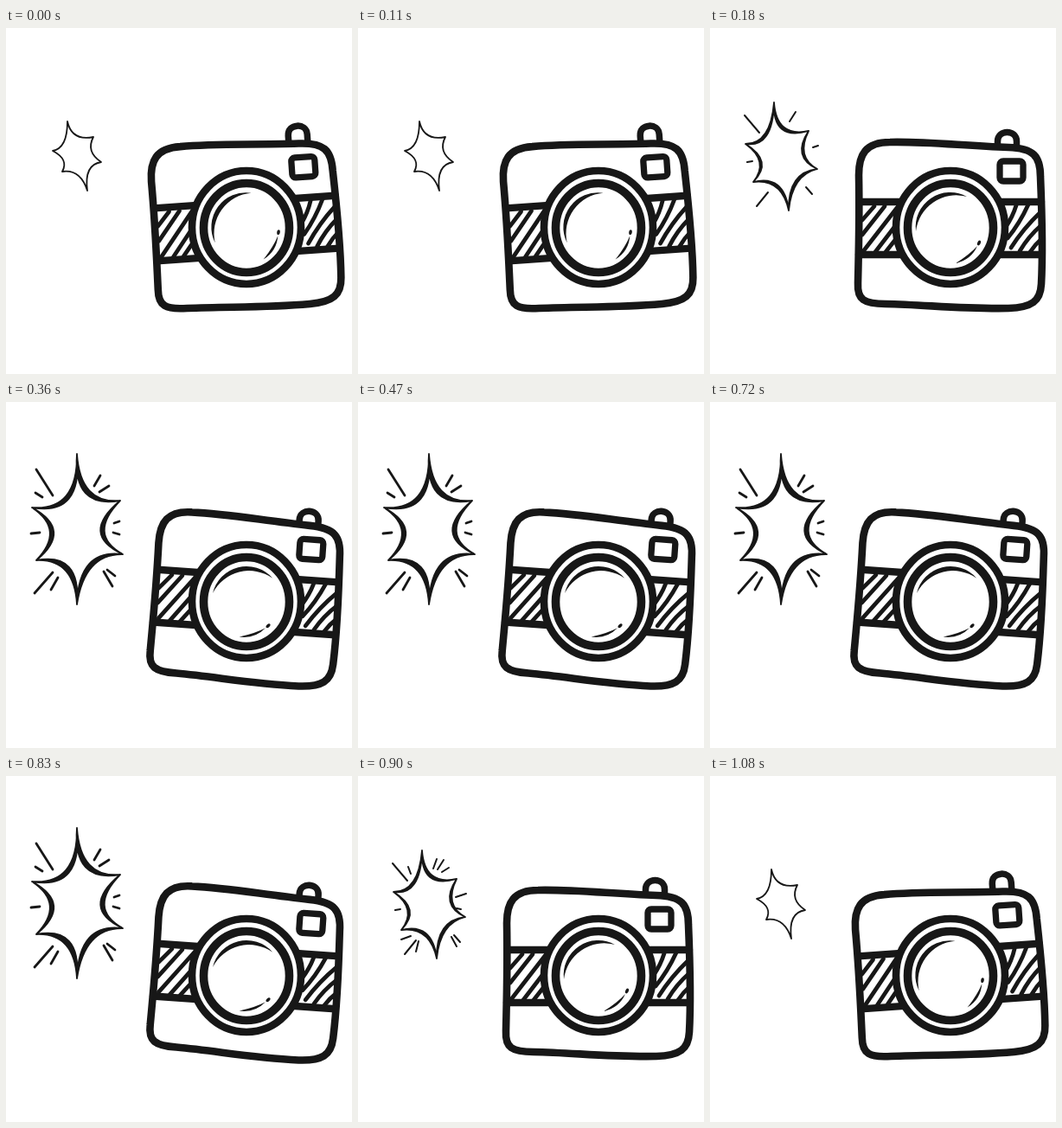
Recreate the animation shown at these times as an HTML page without scripts. Size 400 px wide and 400 px high, loop 1260 ms.

```html
<!DOCTYPE html>
<html lang="en">
<head>
<meta charset="utf-8">
<title>Camera flash</title>
<style>
  html, body { margin: 0; width: 100%; height: 100%; overflow: hidden; background: #fff; }
  svg { display: block; width: 100%; height: 100%; }
  .line { fill: none; stroke: #171717; stroke-linecap: round; stroke-linejoin: round; }
  .paper { fill: #fff; }
  .solid { fill: #171717; }
  .burst { fill: #171717; fill-rule: evenodd; stroke: #171717; stroke-width: 1.8; stroke-linejoin: round; }
</style>
</head>
<body>
<svg viewBox="0 0 400 400">
  <!-- camera body, rocking around the lens -->
  <g>
    <animateTransform attributeName="transform" type="rotate" calcMode="discrete" dur="1.26s" repeatCount="indefinite"
      values="-4 278 230; 0 278 230; 4 278 230; 8 278 230; 4 278 230; 0 278 230; -4 278 230"/>
    <path class="line" stroke-width="7.5" d="M332.5 140V131C332.5 117 354.5 117 354.5 131V140">
      <animateTransform attributeName="transform" type="translate" calcMode="discrete" dur="1.26s" repeatCount="indefinite"
        values="1 -3; 0 0; 0 1; 0 3; 0 1; 0 0; 1 -3"/>
    </path>
    <path class="line paper" stroke-width="8.6" d="M172 170C172 146 180 132 208 132C250 131 290 136 345 138
      C374 139 382 148 382 172C384 220 385 260 383 296C382 316 372 323 345 324C290 325 250 320 203 319C178 319 170 314 171 295C172 250 173 220 172 170Z"/>
    <rect class="line" stroke-width="7.3" x="335" y="154" width="27" height="23" rx="4"/>
    <path class="line" stroke-width="8.4" d="M173 201H383M172 262H383"/>
    <path class="line" stroke-width="4.8" d="M176 222L190 206M176 239L202 206M178 257L216 208M191 259L214 229M203 259L214 245
      M342 230Q350 218 354 205M344 243Q358 226 368 204M348 254Q362 232 382 213M358 258Q368 241 383 228M370 259Q376 250 383 244"/>
  </g>

  <!-- lens -->
  <ellipse class="line paper" stroke-width="8.6" cx="278" cy="230.5" rx="63" ry="65.5"/>
  <ellipse class="line" stroke-width="9.6" cx="278" cy="231" rx="49.5" ry="51.5"/>
  <g class="solid">
    <animateTransform attributeName="transform" type="rotate" calcMode="discrete" dur="1.26s" repeatCount="indefinite"
      values="-20 278 231; 0 278 231; 20 278 231; 40 278 231; 20 278 231; 0 278 231; -20 278 231"/>
    <path d="M238 235A40 40 0 0 1 297 195A47 47 0 0 0 238 235Z"/>
    <path d="M309 252Q302 268 284 272Q300 262 309 252Z"/>
    <ellipse cx="311" cy="248.5" rx="1.8" ry="3" transform="rotate(25 311 248.5)"/>
  </g>

  <!-- flash, from spark to full burst and back -->
  <g>
    <animate attributeName="display" calcMode="discrete" dur="1.26s" repeatCount="indefinite"
      values="inline;none;none;none;none;none;inline"/>
    <path class="line" stroke-width="1.8" d="M71 108Q76 131 101 126Q92 143 110 155Q90 158 94 188Q86 163 65 166Q73 152 54 142Q71 139 71 108Z"/>
  </g>
  <g display="none">
    <animate attributeName="display" calcMode="discrete" dur="1.26s" repeatCount="indefinite"
      values="none;inline;none;none;none;inline;none"/>
    <path class="burst" d="M74 86Q77 127 114 119Q99 149 124 163Q95 170 91 211Q83 174 50 178Q69 154 41 134Q70 134 74 86Z
      M74 86Q72 131 114 119Q94 149 124 163Q90 167 91 211Q86 169 50 178Q74 154 41 134Q73 139 74 86Z"/>
    <path class="line" stroke-width="2" d="M40 101L57 121M99 97L92 108M119 138L125 136M111 184L118 192M54 206L67 190M43 155L49 154"/>
    <path class="line" stroke-width="2" display="none" d="M58 105L61 113M91 96L87 107M97 111L105 106M113 140L119 138M114 153L119 154M108 186L114 197M50 189L61 185M67 203L70 191">
      <animate attributeName="display" calcMode="discrete" dur="1.26s" repeatCount="indefinite"
        values="none;none;none;none;none;inline;none"/>
    </path>
  </g>
  <g display="none">
    <animate attributeName="display" calcMode="discrete" dur="1.26s" repeatCount="indefinite"
      values="none;none;inline;none;inline;none;none"/>
    <path class="burst" d="M82 60Q86 118 132 114Q94 153 135 176Q91 175 82 234Q79 181 35 183Q69 148 30 122Q83 126 82 60Z
      M82 60Q77 124 132 114Q85 153 135 176Q84 169 82 234Q87 173 35 183Q78 148 30 122Q89 133 82 60Z"/>
    <path class="line" stroke-width="2.8" d="M35 78L54 108M34 105L42 110M102 97L109 85M108 104L119 97M125 140L131 138M124 151L131 153
      M113 196L123 213M117 194L126 201M29 152L39 151M33 221L54 197M52 217L60 203"/>
  </g>
  <g display="none">
    <animate attributeName="display" calcMode="discrete" dur="1.26s" repeatCount="indefinite"
      values="none;none;none;inline;none;none;none"/>
    <path class="burst" d="M98 40Q99 113 148 114Q102 161 147 191Q78 199 67 256Q70 184 17 178Q59 149 22 105Q91 113 98 40Z
      M98 40Q85 122 148 114Q90 160 147 191Q69 188 67 256Q79 174 17 178Q69 149 22 105Q99 123 98 40Z"/>
    <path class="line" stroke-width="3.5" d="M37 54L57 91M35 81L50 93M62 68L65 79M120 68L110 87M133 74L116 94M123 97L136 88
      M135 148L144 145M137 158L143 160M94 233L96 240M107 215L120 234M112 213L130 228M118 210L127 214
      M8 229L39 204M9 199L31 201M36 228L46 209M15 149L26 151"/>
  </g>
</svg>
</body>
</html>
```
